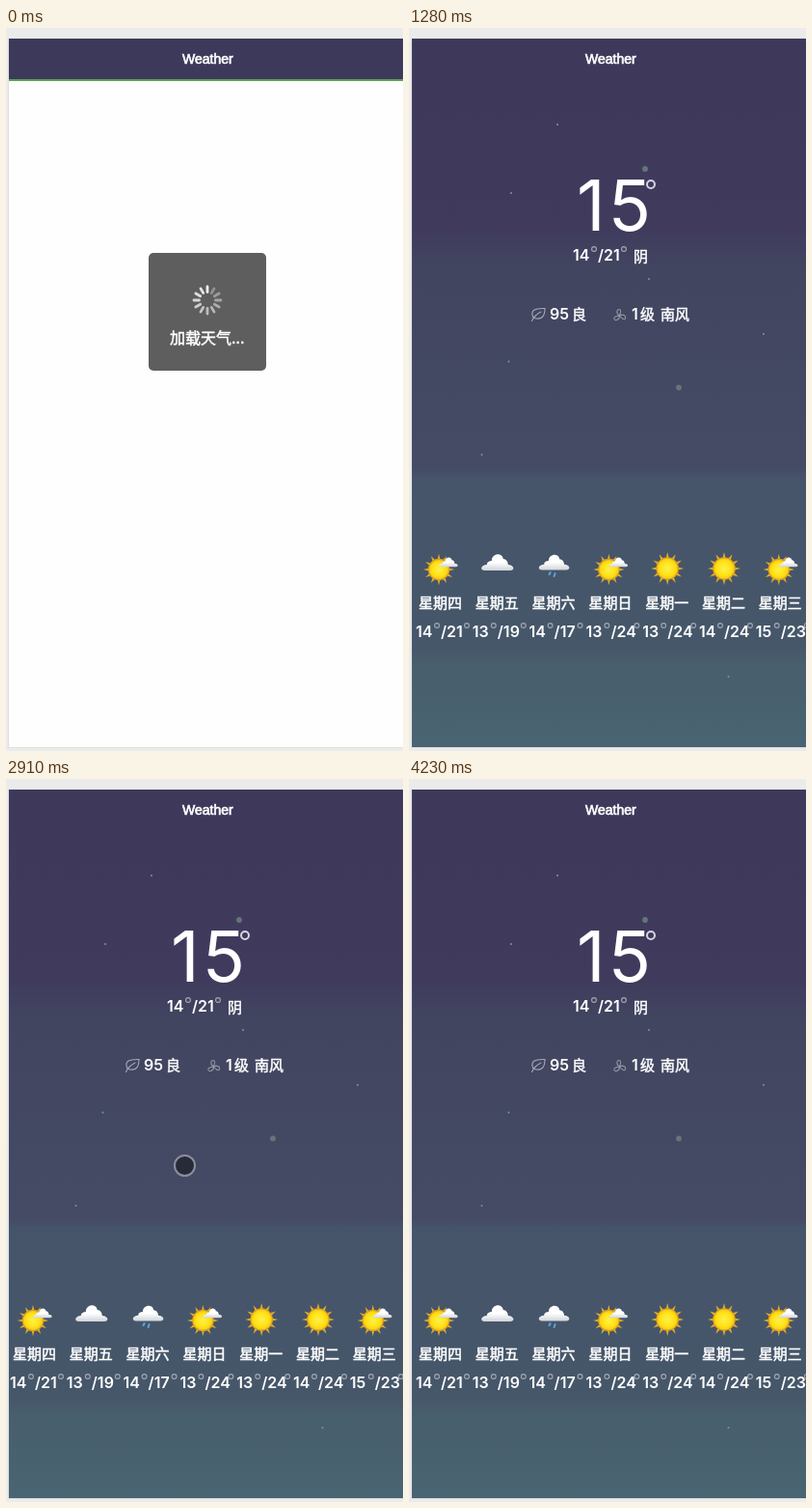
Recreate the animation shown at these times as an HTML page. Size 412x749 px, loop 4.69 s.

```html
<!DOCTYPE html>
<html lang="zh">
<head>
<meta charset="utf-8">
<title>Weather</title>
<style>
html, body { margin: 0; width: 100%; height: 100%; overflow: hidden; background: #ebebeb; }
svg { display: block; }
text { fill: #fff; font: 600 16px Inter, Roboto, "Noto Sans CJK SC", sans-serif; }
.cjk { font: 500 15px "Noto Sans CJK SC", "Noto Sans CJK", sans-serif; stroke: #fff; stroke-width: .5; }
.title { font: 14px "Liberation Sans", Arial, sans-serif; stroke: #fff; stroke-width: .7; }
.big { font-size: 73px; font-weight: 400; letter-spacing: 4px; }
.line { fill: none; stroke: #a5a8b5; stroke-width: 1.1; stroke-linecap: round; }
</style>
</head>
<body>
<svg width="412" height="749" viewBox="0 0 412 749">
  <defs>
    <linearGradient id="sky" x1="0" y1="11" x2="0" y2="745" gradientUnits="userSpaceOnUse">
      <stop offset="0" stop-color="#3e395b"/>
      <stop offset=".27" stop-color="#403b5d"/>
      <stop offset=".32" stop-color="#414560"/>
      <stop offset=".605" stop-color="#454a65"/>
      <stop offset=".62" stop-color="#465469"/>
      <stop offset=".86" stop-color="#46576a"/>
      <stop offset=".885" stop-color="#485f6d"/>
      <stop offset="1" stop-color="#496472"/>
    </linearGradient>
    <radialGradient id="disk">
      <stop offset="0" stop-color="#fff04a"/>
      <stop offset=".7" stop-color="#ffe215"/>
      <stop offset="1" stop-color="#f6cb13"/>
    </radialGradient>
    <linearGradient id="fluff" x1="0" y1="0" x2="0" y2="1">
      <stop offset=".5" stop-color="#fff"/>
      <stop offset="1" stop-color="#cfd3d9"/>
    </linearGradient>
    <clipPath id="page"><rect x="3" y="11" width="409" height="734"/></clipPath>
    <path id="cloud" fill="url(#fluff)" d="M-13 9C-19 9-17 3-11 3C-11 0-8-1-6-1C-6-9 5-10 6-3C9-3 11 0 11 3C17 3 19 9 13 9Z"/>
    <g id="sun"><path id="rays" fill="#e5ab2c"/><circle r="11.8" fill="#d9a01f"/><circle r="10.6" fill="url(#disk)"/></g>
  </defs>
  <rect x="2" y="10" width="412" height="736" fill="#e0e0e0"/>
  <g id="loading">
    <rect x="3" y="11" width="409" height="734" fill="#fefefe"/>
    <rect x="3" y="11" width="409" height="42" fill="#3d395b"/>
    <rect x="3" y="53" width="409" height="2" fill="#5ba54e"/>
    <rect x="148" y="233" width="122" height="122" rx="5" fill="#5e5e5e"/>
    <g id="spinner" transform="translate(209 282)" stroke="#fff" stroke-width="2.8" stroke-linecap="round"/>
    <text class="cjk" x="170" y="327" style="font-size:16px">加载天气...</text>
  </g>
  <g id="weather">
    <rect x="3" y="11" width="409" height="734" fill="url(#sky)"/>
    <g clip-path="url(#page)"><g id="content"></g></g>
    <circle id="touch" r="10.5" fill="#272b38" stroke="#8b8f9c" stroke-width="2"/>
  </g>
  <text class="title" x="183" y="37">Weather</text>
</svg>
<script>
const $ = id => document.getElementById(id);
const range = (n, f) => Array.from({ length: n }, (_, i) => f(i)).join('');
const text = (x, y, s, cls = '') => `<text x="${x}" y="${y}" class="${cls}">${s}</text>`;
const use = (id, x, y, scale = 1) => `<use href="#${id}" transform="translate(${x} ${y}) scale(${scale})"/>`;
const ring = (x, y) => `<circle cx="${x}" cy="${y}" r="2.4" class="line"/>`;
const star = ([x, y]) => `<circle cx="${x}" cy="${y}" r="1" fill="#84948f"/>`;
const orb = ([x, y]) => `<circle cx="${x}" cy="${y}" r="2.9" fill="#66747a"/>`;
const temps = (x, y, range) => {
  const [low, high] = range.split('/');
  return text(x, y, low) + ring(x + 22, y - 12) + text(x + 26, y, '/' + high) + ring(x + 53, y - 12);
};

const icons = {
  sun: x => use('sun', x, 560),
  cloud: x => use('cloud', x, 553),
  mixed: x => use('sun', x - 2, 561, .95) + use('cloud', x + 8, 553, .58),
  rain: x => use('cloud', x, 553, .95) +
    `<path d="M${x - 4} 564l-1 2M${x + 1} 565l-1 3" stroke="#5ba4dc" stroke-width="2" stroke-linecap="round"/>`
};
const days = [
  '四 mixed 14/21', '五 cloud 13/19', '六 rain 14/17', '日 mixed 13/24',
  '一 sun 13/24', '二 sun 14/24', '三 mixed 15/23'
];
const stars = [[154, 100], [106, 171], [249, 260], [368, 317], [103.5, 345.5], [75.5, 442], [331.5, 672]];
const orbs = [[245, 146], [280, 372.5]];

$('rays').setAttribute('d', range(12, i => {
  const p = (r, turn) => {
    const a = (i + turn) * Math.PI / 6;
    return `${(r * Math.sin(a)).toFixed(2)} ${(-r * Math.cos(a)).toFixed(2)}`;
  };
  return `M${p(11, -.27)}L${p(17, 0)}L${p(11, .27)}Z`;
}));

$('spinner').innerHTML = range(12, i =>
  `<path d="M0-8.5V-14" transform="rotate(${i * 30})" opacity="${i ? .28 + .052 * i : .9}"/>`);

$('content').innerHTML =
  stars.map(star).join('') + orbs.map(orb).join('') +
  text(174, 210, 15, 'big') +
  '<circle cx="251" cy="162" r="4" fill="none" stroke="#d3d6de" stroke-width="2"/>' +
  temps(170, 241, '14/21') + text(233, 242, '阴', 'cjk') +
  '<path class="line" d="M127.5 303.5C130 298 133 296 137 294M129 300C125 292 132 290 141 290.5C141 298 138 303 130 300.5"/>' +
  text(146, 302, 95) + text(169, 302, '良', 'cjk') +
  range(3, i => `<path class="line" opacity=".8" transform="translate(218.5 298) rotate(${i * 120})" d="M0 0C-4-2-3-7 0-6.5C2-6 1-3 0 0"/>`) +
  text(231, 302, 1) + text(240, 302, '级', 'cjk') + text(261, 302, '南风', 'cjk') +
  days.map((line, i) => {
    const [day, icon, degrees] = line.split(' ');
    const x = 33 + 58.8 * i;
    return icons[icon](x) + text(x - 23, 601, '星期' + day, 'cjk') + temps(x - 26, 631, degrees);
  }).join('');

// Pointer gestures: key points as [step, x, y], straight and even between them.
const STEP = 147.6;
const flick = { start: 540, keys: [[0, 71, 698], [2, 250, 301], [4, 389, 737]] };
const drag = {
  start: 1720, press: 8,
  keys: [[0, 356, 711], [3, 281, 510], [5, 315.5, 439.5], [7, 192, 367], [8, 185.5, 400.5],
    [10, 241, 422], [12, 252.5, 316.5], [13, 377, 430], [16, 387, 735]]
};

function pointAt(keys, step) {
  const next = keys.findIndex(k => k[0] > step);
  if (next < 0) return keys.at(-1).slice(1);
  const [s0, x0, y0] = keys[next - 1], [s1, x1, y1] = keys[next];
  const u = (step - s0) / (s1 - s0);
  return [x0 + (x1 - x0) * u, y0 + (y1 - y0) * u];
}

function draw() {
  const t = performance.now() % 4690;
  const gesture = t < drag.start ? flick : drag;
  const step = Math.floor((t - gesture.start) / STEP);
  const touching = step >= 0 && step <= gesture.keys.at(-1)[0];
  $('loading').style.display = t < 240 ? '' : 'none';
  $('weather').style.display = t < 240 ? 'none' : '';
  $('touch').style.display = touching ? '' : 'none';
  if (touching) $('touch').setAttribute('transform', `translate(${pointAt(gesture.keys, step)})`);
  // The page gives way slightly when pressed, then snaps back.
  $('content').setAttribute('transform', `translate(${step === gesture.press ? -3 : 0})`);
  requestAnimationFrame(draw);
}
draw();
</script>
</body>
</html>
```
